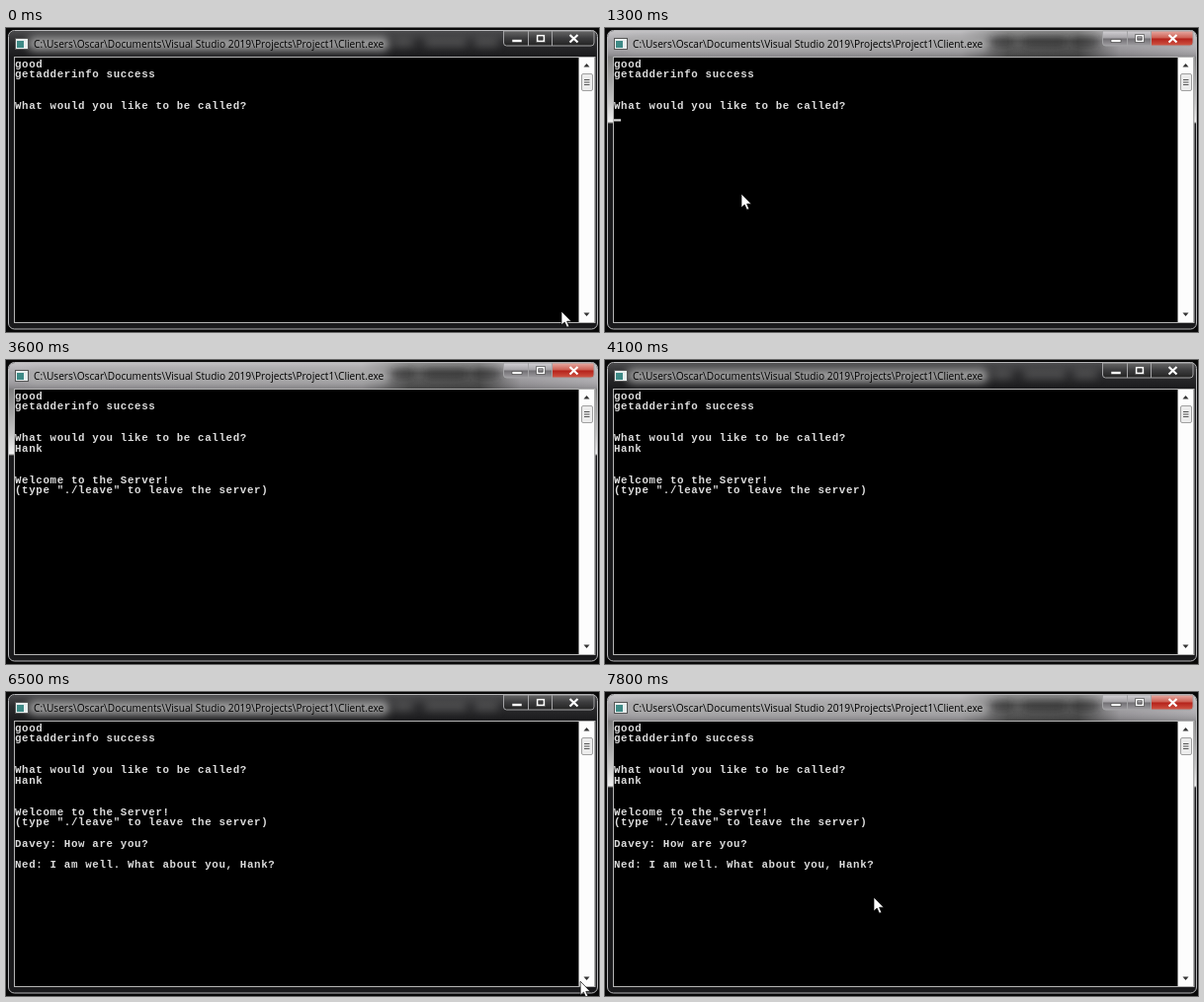
Write an HTML page that moves like this. It is 600 px wide and 308 px high and loops after 8 s.

```html
<!DOCTYPE html>
<html lang="en">
<head>
<meta charset="utf-8">
<title>Console chat</title>
<style>
html, body { margin: 0; width: 100%; height: 100%; overflow: hidden; background: #080808; }
svg { display: block; }
text { white-space: pre; }
.title { font: 10.2px "Open Sans", "Noto Sans", sans-serif; fill: #000; }
.console { font: bold 10.8px "Liberation Mono", monospace; letter-spacing: .64px; fill: #dcdcdc; }
</style>
</head>
<body>
<svg width="600" height="308" viewBox="0 0 600 308">
  <defs>
    <linearGradient id="bar" x2="0" y2="1">
      <stop offset="0" stop-color="#4a4a4c"/><stop offset=".45" stop-color="#2b2b2d"/><stop offset="1" stop-color="#1b1b1d"/>
    </linearGradient>
    <linearGradient id="lit">
      <stop offset="0" stop-color="#a8a6aa"/><stop offset=".6" stop-color="#a09ea2"/><stop offset=".68" stop-color="#555"/>
      <stop offset=".8" stop-color="#4c4c4c"/><stop offset=".87" stop-color="#9c9a9e"/><stop offset="1" stop-color="#b4b2b6"/>
    </linearGradient>
    <linearGradient id="sheen" x2="0" y2="1">
      <stop offset="0" stop-color="#fff" stop-opacity=".35"/><stop offset=".4" stop-color="#fff" stop-opacity="0"/>
      <stop offset="1" stop-color="#000" stop-opacity=".2"/>
    </linearGradient>
    <linearGradient id="side" x2="0" y2="1">
      <stop offset="0" stop-color="#808080"/><stop offset=".7" stop-color="#c8c8c8"/>
      <stop offset=".97" stop-color="#f0f0f0"/><stop offset="1" stop-color="#222"/>
    </linearGradient>
    <linearGradient id="red" x2="0" y2="1">
      <stop offset="0" stop-color="#e8aca4"/><stop offset=".48" stop-color="#cc5c50"/>
      <stop offset=".52" stop-color="#b42018"/><stop offset="1" stop-color="#d05848"/>
    </linearGradient>
    <linearGradient id="pale" x2="0" y2="1">
      <stop offset="0" stop-color="#d4d2d6"/><stop offset=".48" stop-color="#a4a2a6"/>
      <stop offset=".52" stop-color="#706e72"/><stop offset="1" stop-color="#a09ea2"/>
    </linearGradient>
    <linearGradient id="dark" x2="0" y2="1">
      <stop offset="0" stop-color="#666"/><stop offset=".5" stop-color="#3c3c3e"/><stop offset="1" stop-color="#222"/>
    </linearGradient>
    <filter id="soft" x="-10%" y="-80%" width="120%" height="260%"><feGaussianBlur stdDeviation="4"/></filter>
  </defs>

  <!-- window frame -->
  <rect x="2.5" y="2.5" width="596" height="302.5" rx="6" fill="#1a1a1c"/>
  <path d="M3 29V9q0-6 6-6H592q6 0 6 6V29Z" fill="url(#bar)"/>
  <g id="glass">
    <path d="M3 29V9q0-6 6-6H592q6 0 6 6V29Z" fill="url(#lit)"/>
    <path d="M3 29V9q0-6 6-6H592q6 0 6 6V29Z" fill="url(#sheen)"/>
    <path d="M3 29h5v68H3zM596 29h2v68h-2z" fill="url(#side)"/>
  </g>
  <rect x="22" y="9" width="366" height="14" rx="7" fill="#aaa" opacity=".9" filter="url(#soft)"/>
  <g id="behind" filter="url(#soft)">
    <rect x="392" y="10" width="20" height="9"/><rect x="424" y="10" width="42" height="9"/><rect x="474" y="10" width="24" height="9"/>
  </g>
  <rect x="2.5" y="2.5" width="596" height="302.5" rx="6" fill="none" stroke="#b8b8ba"/>
  <rect x="9.5" y="10.5" width="13" height="11" fill="#e8eeee" stroke="#555"/>
  <rect x="11" y="13" width="7" height="7" fill="#3e8a86"/>
  <text class="title" x="28" y="19.6">C:\Users\Oscar\Documents\Visual Studio 2019\Projects\Project1\Client.exe</text>

  <!-- window buttons -->
  <g stroke="#a4a4a6">
    <path id="pair" d="M503.5 3V15q0 3 3 3H552.5V3Z"/>
    <path id="close" d="M552.5 3V18H592q3 0 3-3V3Z"/>
    <path d="M528.5 3V18" fill="none"/>
  </g>
  <g stroke="#333" stroke-width=".6" fill="#fff">
    <path d="M512 11.5h10v3h-10z"/>
    <path d="M536.5 6.5h9v8h-9zM538.7 8.7v3.6h4.6v-3.6z" fill-rule="evenodd"/>
  </g>
  <path d="M570.5 7l8 7.5m0-7.5l-8 7.5" stroke="#fff" stroke-width="2.2"/>

  <!-- client area -->
  <rect x="8.5" y="29.5" width="587.5" height="269" fill="#000" stroke="#b4b4b4"/>
  <rect x="579.5" y="30" width="16" height="268" fill="#fdfdfd"/>
  <path d="M584.5 39.5l3-3.5 3 3.5zM584.5 288.5l3 3.5 3-3.5z" fill="#333"/>
  <rect x="582.5" y="46.5" width="11" height="17" rx="1.5" fill="#ececec" stroke="#a0a0a0"/>
  <path d="M585 52.5h5.5m-5.5 2.5h5.5m-5.5 2.5h5.5" stroke="#555"/>
  <g id="lines" class="console"></g>
  <rect id="caret" y="92.3" width="7.1" height="2.2" fill="#dcdcdc"/>
  <path id="mouse" d="M0 0V14L3.2 11 5.6 16.2 7.8 15.2 5.6 10.2H10Z" fill="#fff" stroke="#000" stroke-width=".7"/>
</svg>
<script>
const LOOP = 8000, STEP = 100, LEFT = 9, CELL = 7.12, ROW = 10.65;
const $ = id => document.getElementById(id);
const show = (el, on) => el.setAttribute('visibility', on ? 'visible' : 'hidden');
const fill = (id, paint) => $(id).setAttribute('fill', `url(#${paint})`);

// [row, time shown, text]
const lines = [
  [0, 0, 'good'],
  [1, 0, 'getadderinfo success'],
  [4, 0, 'What would you like to be called?'],
  [5, 0, ''],
  [8, 2700, 'Welcome to the Server!'],
  [9, 2700, '(type "./leave" to leave the server)'],
  [11, 4800, 'Davey: How are you?'],
  [13, 6400, 'Ned: I am well. What about you, Hank?']
].map(([row, from, words]) => {
  const el = document.createElementNS('http://www.w3.org/2000/svg', 'text');
  el.setAttribute('x', LEFT);
  el.setAttribute('y', 39.6 + row * ROW);
  el.textContent = words;
  $('lines').append(el);
  return { el, from };
});
const answer = lines[3].el, name = 'Hank', keys = [1400, 1700, 1900, 2200];

function glide(t, start, end, a, b) {
  const p = Math.min(1, Math.max(0, (t - start) / (end - start)));
  const e = p * p * (3 - 2 * p);
  return a.map((v, i) => v + (b[i] - v) * e);
}

function mouseAt(t) {
  const rest = [138, 168];
  if (t < 3400) return glide(t, 0, 500, [562, 287], rest);
  if (t < 3600) return glide(t, 3400, 3600, rest, [58, 168]);
  if (t < 6500) return null;
  return t < 7200 ? glide(t, 6400, 7000, [606, 300], [271, 208]) : [272, 208];
}

function draw(t) {
  const active = t >= 600 && t < 4100 || t >= 7200;
  fill('close', active ? 'red' : 'dark');
  fill('pair', active ? 'pale' : 'dark');
  show($('glass'), active);
  $('behind').setAttribute('fill', active ? '#222' : '#777');
  $('behind').setAttribute('opacity', .5);

  for (const { el, from } of lines) show(el, t >= from);
  const typed = keys.filter(k => t >= k).length;
  answer.textContent = name.slice(0, typed);
  $('caret').setAttribute('x', LEFT + typed * CELL);
  show($('caret'), t >= 1300 && t < 1400 || t >= 2000 && t < 2200);

  const spot = mouseAt(t);
  show($('mouse'), spot);
  if (spot) $('mouse').setAttribute('transform', `translate(${spot})`);
}

const begin = performance.now();
function tick() {
  const t = (performance.now() - begin) % LOOP;
  draw(Math.floor(t / STEP) * STEP);
  requestAnimationFrame(tick);
}
tick();
</script>
</body>
</html>
```
